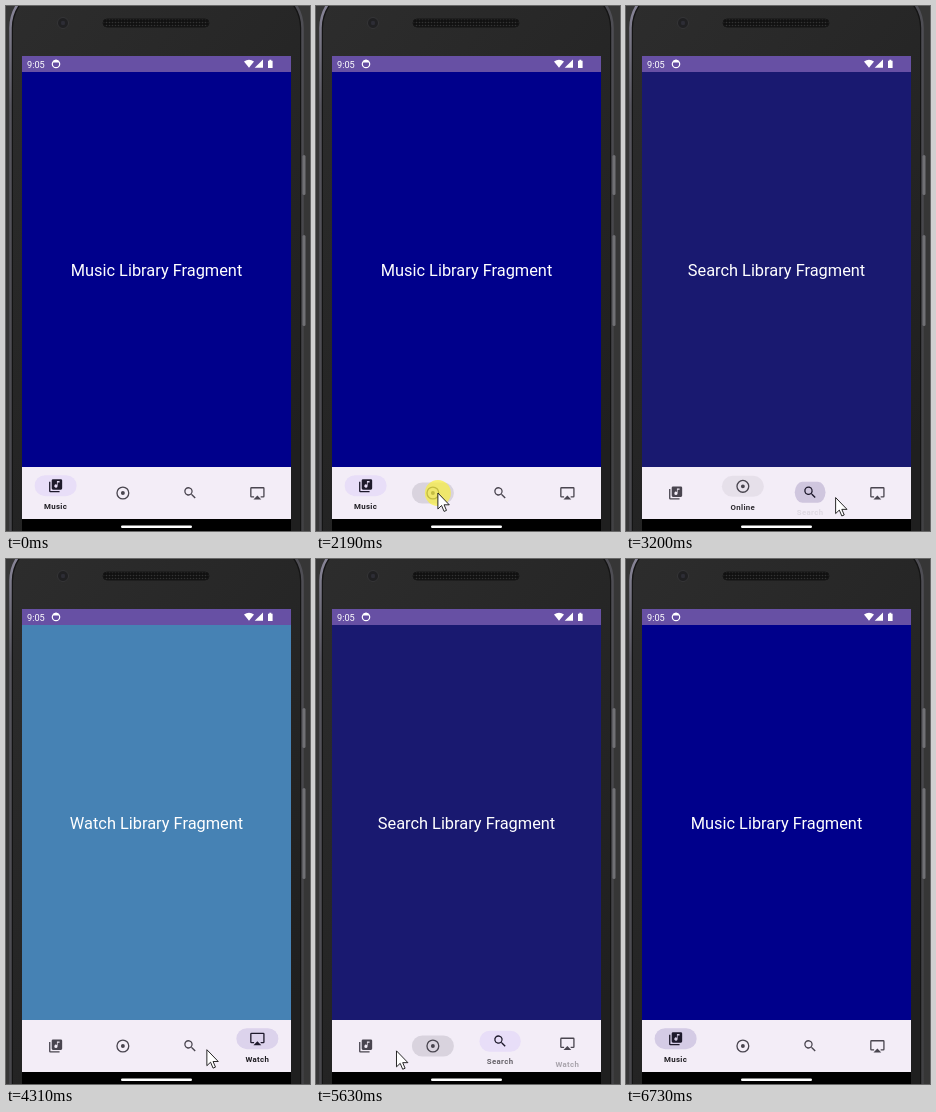
Write an HTML page that moves like this. It is 304 by 525 pixels and loops after 6.8 s.

```html
<!DOCTYPE html>
<html lang="en">
<head>
<meta charset="utf-8">
<title>Bottom navigation</title>
<style>
  html, body { margin: 0; width: 100%; height: 100%; overflow: hidden; background: #363636; }
  svg { display: block; width: 304px; height: 525px; font-family: Roboto, sans-serif; }
  .title { font-size: 16.36px; fill: #fff; text-anchor: middle; }
  .clock { font-size: 9.2px; fill: #fff; }
  .label { font-size: 7.85px; font-weight: 700; letter-spacing: .33px; fill: #1d1b20; text-anchor: middle; }
</style>
</head>
<body>
<svg viewBox="0 0 304 525">
  <defs>
    <linearGradient id="body" x2=".6" y2="1">
      <stop stop-color="#2d2d2d"/><stop offset="1" stop-color="#1f1f1f"/>
    </linearGradient>
    <linearGradient id="rim" x2=".5" y2="1">
      <stop stop-color="#9491a6"/><stop offset=".16" stop-color="#55545c"/><stop offset="1" stop-color="#414144"/>
    </linearGradient>
    <pattern id="mesh" width="3" height="3" patternUnits="userSpaceOnUse">
      <rect width="3" height="3" fill="#111"/><circle cx="1.5" cy="1.5" r=".8" fill="#333"/>
    </pattern>
  </defs>

  <!-- Phone -->
  <rect width="304" height="525" fill="#363636"/>
  <rect x="4.5" y="-20" width="292" height="600" rx="42" fill="#141414" stroke="url(#rim)" stroke-width="2.5"/>
  <rect x="7" y="-17" width="287" height="600" rx="39" fill="url(#body)"/>
  <g fill="#707074">
    <rect x="296.5" y="149" width="3" height="40" rx="1.5"/>
    <rect x="296.5" y="229" width="3" height="91" rx="1.5"/>
  </g>
  <circle cx="57" cy="17" r="5.5" fill="#202022" stroke="#353537"/>
  <circle cx="57" cy="17" r="2.2" fill="#2d2d35"/>
  <rect x="97" y="13" width="106" height="8" rx="4" fill="url(#mesh)" stroke="#151515"/>

  <!-- Screen -->
  <rect x="16" y="50" width="269" height="475"/>
  <rect x="16" y="50" width="269" height="16" fill="#6750a4"/>
  <text class="clock" x="21" y="61.5">9:05</text>
  <circle cx="50" cy="58" r="3.7" fill="none" stroke="#fff" stroke-width="1.2"/>
  <path d="M47 56.5h6v-1.5l-3-1.4-3 1.4Z" fill="#fff"/>
  <g fill="#fff">
    <path d="M238 55.5q5-3.4 10 0l-5 6.3Z"/>
    <path d="M257 53.5v8.3h-8.3Z"/>
    <path d="M262 54.8h1.3v-1h2v1h1.3v7.2H262Z"/>
  </g>
  <rect id="page" x="16" y="66" width="269" height="395"/>
  <text id="title" class="title" x="150.5" y="270"></text>
  <rect x="16" y="461" width="269" height="52" fill="#f3edf7"/>
  <g id="nav"></g>
  <rect x="115" y="519.4" width="71" height="2.6" rx="1.3" fill="#fff"/>

  <g id="pointer">
    <circle id="halo" r="13" fill="#f8f03c" fill-opacity=".7"/>
    <path d="M0 0V16l3.7-3.5 2.5 5.9 2.4-1-2.4-5.6H11.4Z" fill="#fff" stroke="#111" stroke-width=".9"/>
  </g>
</svg>
<script>
const LOOP = 6800;
const POINTER_Y = 487;

const tabs = [
  { name: 'Music', color: '#00008b', icon: 'M20 2H8a2 2 0 0 0-2 2v12a2 2 0 0 0 2 2h12a2 2 0 0 0 2-2V4a2 2 0 0 0-2-2zm-2 5h-3v5.5a2.5 2.5 0 1 1-1-2V5h4zM4 6H2v14a2 2 0 0 0 2 2h14v-2H4z' },
  { name: 'Online', color: '#4169e1', icon: 'M12 2a10 10 0 1 0 0 20 10 10 0 0 0 0-20zm0 18a8 8 0 1 1 0-16 8 8 0 0 1 0 16zm0-11a3 3 0 1 0 0 6 3 3 0 0 0 0-6z' },
  { name: 'Search', color: '#191970', icon: 'M15.5 14h-.8l-.3-.3a6.5 6.5 0 1 0-.7.7l.3.3v.8l5 5 1.5-1.5zm-6 0a4.5 4.5 0 1 1 0-9 4.5 4.5 0 0 1 0 9z' },
  { name: 'Watch', color: '#4682b4', icon: 'M6 22h12l-6-6zM21 3H3a2 2 0 0 0-2 2v12a2 2 0 0 0 2 2h4v-2H3V5h18v12h-4v2h4a2 2 0 0 0 2-2V5a2 2 0 0 0-2-2z' }
];
const tabX = i => 16 + 67.25 * (i + .5);

// The pointer presses on arrival; the phone reacts later, at `selected`.
const taps = [
  { tab: 0, arrive: 1350, leave: 1640, selected: -1000 },
  { tab: 1, arrive: 2090, leave: 2430, selected: 2290 },
  { tab: 2, arrive: 2980, leave: 3080, selected: 3135 },
  { tab: 3, arrive: 3410, leave: 3900, selected: 3930 },
  { tab: 2, arrive: 4460, leave: 4530, selected: 5463 },
  { tab: 1, arrive: 5000, leave: 5400, selected: 5850 },
  { tab: 0, arrive: 5800, leave: 5950, selected: 6450 }
];

const route = [
  { x: 194, y: 513, arrive: 320, leave: 320 },
  { x: 34, y: 473, arrive: 790, leave: 790 },
  { x: tabX(0) + 5, y: POINTER_Y, arrive: 1100, leave: 1350 },
  ...taps.map(tap => ({ ...tap, x: tabX(tap.tab) + 5, y: POINTER_Y })),
  { x: 62, y: 527, arrive: 6190, leave: 6190 }
];

const byId = id => document.getElementById(id);
const clamp = v => Math.max(0, Math.min(1, v));
const mix = (a, b, p) => a + (b - a) * p;
const smooth = p => p * p * (3 - 2 * p);

function set(node, attrs) {
  for (const key in attrs) node.setAttribute(key, attrs[key]);
}
function add(parent, tag, attrs) {
  const node = document.createElementNS('http://www.w3.org/2000/svg', tag);
  set(node, attrs);
  return parent.appendChild(node);
}

const pillShape = { x: -21, y: -10.5, width: 42, height: 21, rx: 10.5 };
const items = tabs.map((tab, i) => {
  const group = add(byId('nav'), 'g', { transform: `translate(${tabX(i)} 0)` });
  const mover = add(group, 'g', {});
  const pill = add(mover, 'rect', pillShape);
  const ripple = add(mover, 'rect', { ...pillShape, fill: '#1d192b' });
  const icon = add(mover, 'path', { d: tab.icon, transform: 'scale(.6545) translate(-12 -12)' });
  const label = add(group, 'text', { class: 'label', x: 0 });
  label.textContent = tab.name;
  return { mover, pill, ripple, icon, label };
});

// A ripple precedes each selection, and the next one replaces it.
function rippleAt(t) {
  const tap = taps.findLast(({ selected }) => t >= selected - 300);
  const age = t - tap.selected;
  return { tab: tap.tab, alpha: .12 * clamp((age + 300) / 80) * clamp((520 - age) / 300) };
}

function drawTabs(t) {
  const step = taps.findLastIndex(({ selected }) => t >= selected);
  const { tab: current, selected } = taps[step];
  const previous = taps[step - 1]?.tab;
  const age = t - selected;
  const grow = 1 - (1 - clamp(age / 200)) ** 2;
  const shift = clamp((age - 50) / 180);
  const pressed = rippleAt(t);

  set(byId('page'), { fill: tabs[current].color });
  byId('title').textContent = tabs[current].name + ' Library Fragment';

  items.forEach(({ mover, pill, ripple, icon, label }, i) => {
    const on = i === current;
    const leaving = i === previous;
    const lift = on ? shift : leaving ? 1 - shift : 0;
    const pillAlpha = on ? clamp(age / 40) : leaving ? clamp(1 - age / 150) : 0;
    const transform = `scale(${on ? mix(.4, 1, grow) : 1} 1)`;
    set(mover, { transform: `translate(0 ${mix(487, 479.7, lift)})` });
    set(pill, { transform, opacity: pillAlpha, fill: on ? '#e8def8' : '#ddd7e0' });
    set(ripple, { transform, opacity: i === pressed.tab ? pressed.alpha : 0 });
    set(icon, { fill: on ? '#1d192b' : '#49454f' });
    set(label, { y: mix(510, 503, lift), opacity: lift });
  });
}

function drawPointer(t) {
  const next = route.findIndex(({ arrive }) => arrive > t);
  const visible = next > 0;
  set(byId('pointer'), { visibility: visible ? 'visible' : 'hidden' });
  if (!visible) return;
  const from = route[next - 1], to = route[next];
  const p = clamp((t - from.leave) / (to.arrive - from.leave));
  const dip = 'tab' in from && 'tab' in to ? 5 * Math.sin(Math.PI * p) : 0;
  const x = mix(from.x, to.x, smooth(p));
  const y = mix(from.y, to.y, smooth(p)) + dip;
  set(byId('pointer'), { transform: `translate(${x} ${y})` });
  set(byId('halo'), { opacity: 'tab' in from && t < from.arrive + 130 ? 1 : 0 });
}

const begin = performance.now();
function frame() {
  const t = (performance.now() - begin) % LOOP;
  drawTabs(t);
  drawPointer(t);
  requestAnimationFrame(frame);
}
frame();
</script>
</body>
</html>
```
